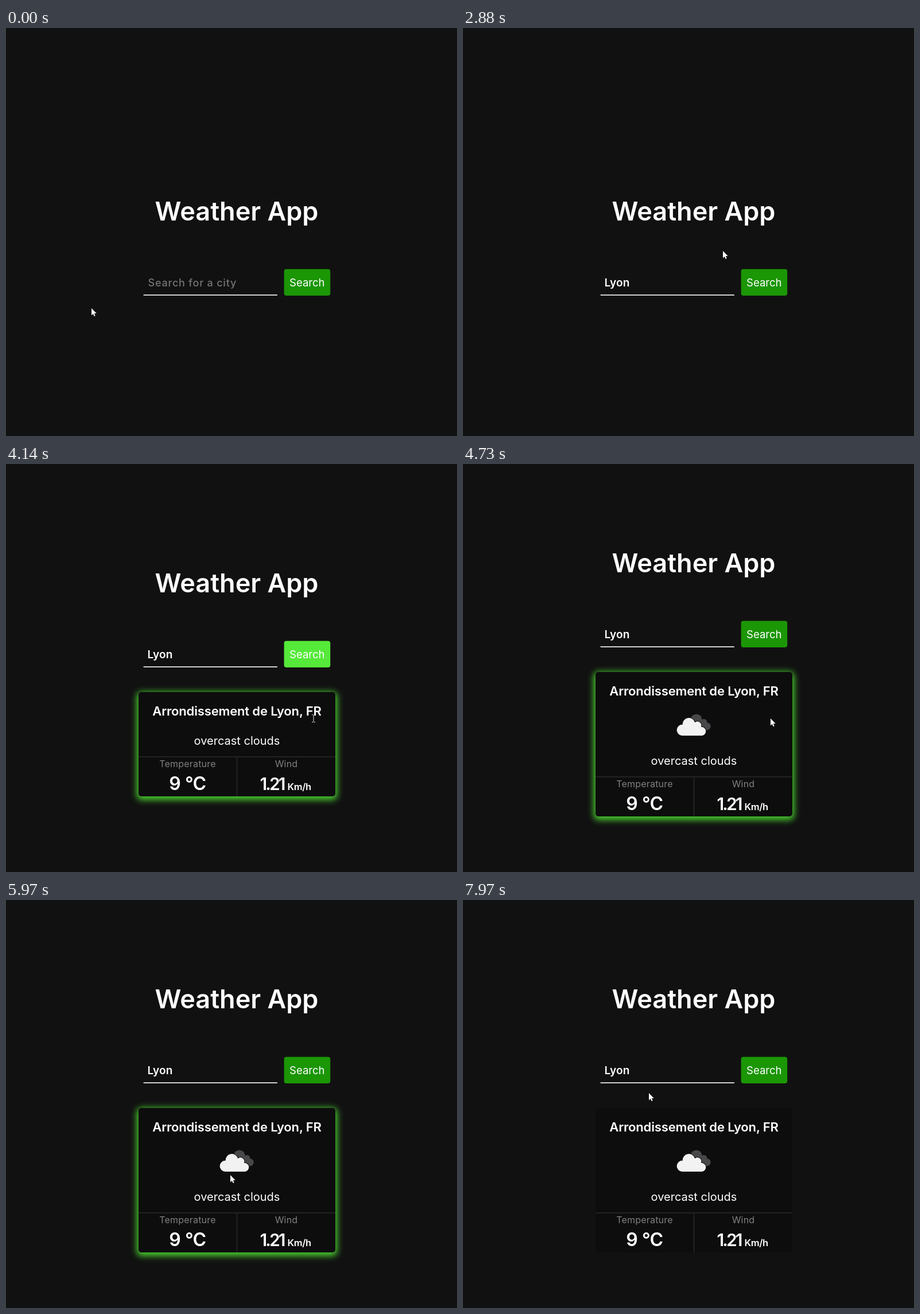
An HTML page for the animation above (8 s loop, 786x712 px).

```html
<!DOCTYPE html>
<html lang="en">
<head>
<meta charset="utf-8">
<title>Weather App</title>
<style>
  html, body { margin: 0; width: 100%; height: 100%; overflow: hidden; background: #111; }
  svg { position: absolute; left: 0; top: 0; }
  text { font-family: Inter, Roboto, sans-serif; fill: #fff; }
  .mid { text-anchor: middle; }
  #title { font-size: 45px; font-weight: 600; }
  #hint { font-size: 18px; font-weight: 500; letter-spacing: .8px; fill: #757575; }
  #typed { font-size: 19px; font-weight: 600; letter-spacing: .1px; }
  .label { font-size: 18.5px; }
  .city { font-size: 22px; font-weight: 600; letter-spacing: -.15px; }
  .sky { font-size: 20px; }
  .caption { font-size: 16px; letter-spacing: .2px; fill: #808080; }
  .value { font-size: 32px; font-weight: 600; letter-spacing: -.5px; }
  .speed { font-size: 30px; font-weight: 600; letter-spacing: -2.9px; }
  .unit { font-size: 16.5px; font-weight: 600; letter-spacing: -.4px; }
  #card { position: absolute; left: 231px; width: 343px; border-radius: 5px; background: #0d0d0d; }
</style>
</head>
<body>
<div id="card"></div>
<svg width="786" height="712" viewBox="0 0 786 712">
  <g id="top">
    <text id="title" class="mid" x="402" y="336">Weather App</text>
    <text id="hint" x="247.5" y="450.5">Search for a city</text>
    <text id="typed" x="246.5" y="450.5"></text>
    <rect id="caret" y="432" width="1" height="24" fill="#fff"/>
    <rect x="239.6" y="465.2" width="233.2" height="1.6" fill="#fff"/>
    <rect id="button" x="484.6" y="420.8" width="80.6" height="46.2" rx="4"/>
    <text class="label mid" x="524.8" y="450.5">Search</text>
  </g>
  <g id="result">
    <g id="head">
      <text class="city mid" x="402.5" y="439">Arrondissement de Lyon, FR</text>
    </g>
    <g id="cloud" transform="translate(-.8 -.6)">
      <g fill="#48484a">
        <circle cx="407.5" cy="447" r="10"/>
        <circle cx="420.5" cy="451" r="5.5"/>
        <circle cx="426" cy="458.3" r="6.5"/>
        <rect x="407" y="450" width="19" height="14.8"/>
      </g>
      <path fill="#f2f2f2" stroke="#0d0d0d" stroke-width="2" paint-order="stroke"
        d="M382.5 474.6A9.5 9.5 0 0 1 383.5 455.3A11 11 0 0 1 405 451.5A6.8 6.8 0 0 1 415.5 459.5A7.4 7.4 0 0 1 417.5 474.6Z"/>
    </g>
    <g id="details">
      <text class="sky mid" x="402.5" y="490">overcast clouds</text>
      <path d="M231 511H574M402.5 511V580" stroke="#2a2a2a" stroke-width="1.5"/>
      <text class="caption mid" x="316.5" y="529">Temperature</text>
      <text class="caption mid" x="488.5" y="529">Wind</text>
      <text class="value mid" x="316.5" y="569">9 °C</text>
      <text class="speed" x="442.5" y="569">1.21</text>
      <text class="unit" x="490.5" y="569">Km/h</text>
    </g>
  </g>
  <g id="pointer">
    <path id="arrow" fill="#fff" d="M0 0V12.4L2.8 9.8L4.7 14L6.6 13.2L4.8 9H8.7Z"/>
    <path id="beam" fill="none" stroke="#ddd" d="M-3 -6.5H-1L0 -5.5L1 -6.5H3M0 -5.5V5.5M-3 6.5H-1L0 5.5L1 6.5H3"/>
  </g>
</svg>
<script>
const LOOP = 8000, RESULT = 4140, ICON = 4230;
const $ = id => document.getElementById(id);
const show = (id, on) => { $(id).style.display = on ? '' : 'none'; };
const moveY = (id, y) => $(id).setAttribute('transform', `translate(0 ${y})`);

// Each key is [time, value, ...].
const path = [
  [2430, 149, 489], [2650, 300, 412], [2880, 452, 389], [2990, 492, 380],
  [3130, 525, 418], [3300, 536, 444], [4730, 536, 444], [4950, 648, 452],
  [5250, 574, 466.5], [5490, 500, 474], [5590, 500, 474], [6000, 380, 480],
  [6390, 212, 482], [6560, 188, 482], [6710, 191, 481], [6900, 258, 479],
  [7070, 322, 475], [7580, 322, 475], [7970, 324, 337]
];
const hover = [[3130, 0], [3280, 1], [RESULT, 1], [4310, 0]];
const glow = [[4830, 1], [4980, 0], [5255, 0], [5405, 1], [6360, 1], [6510, 0],
  [6830, 0], [6980, 1], [7790, 1], [7930, 0]];
const shift = [[0, 0], [3500, -12], [RESULT, -112], [ICON, -147]];
const typing = [[0, '', 248], [1090, 'L', 257], [1350, 'Ly', 266], [1600, 'Lyo', 278], [2000, 'Lyon', 290]];
const blinks = [[90, 580], [1090, 2500], [3000, 3450]];

const step = (keys, t) => keys.filter(k => k[0] <= t).pop();

function linear(keys, t) {
  const i = keys.findIndex(k => k[0] > t);
  if (i < 0) return keys[keys.length - 1][1];
  if (i === 0) return keys[0][1];
  const [a, b] = [keys[i - 1], keys[i]];
  return a[1] + (b[1] - a[1]) * (t - a[0]) / (b[0] - a[0]);
}

// Flat at rests and turning points, central difference elsewhere.
function slope(keys, i, c) {
  const [a, b, d] = [keys[i - 1], keys[i], keys[i + 1]];
  if (!a || !d || (b[c] - a[c]) * (d[c] - b[c]) <= 0) return 0;
  return (d[c] - a[c]) / (d[0] - a[0]);
}

function smooth(keys, t, c) {
  const i = keys.findIndex(k => k[0] > t);
  if (i < 0) return keys[keys.length - 1][c];
  if (i === 0) return keys[0][c];
  const a = keys[i - 1], b = keys[i], span = b[0] - a[0], u = (t - a[0]) / span;
  const ease = u * u * (3 - 2 * u);
  return a[c] + (b[c] - a[c]) * ease
    + span * u * (1 - u) * ((1 - u) * slope(keys, i - 1, c) - u * slope(keys, i, c));
}

const mix = (from, to, k) => `rgb(${from.map((v, i) => Math.round(v + (to[i] - v) * k))})`;

function draw(t) {
  const found = t >= RESULT, grow = t >= ICON ? 35 : 0;
  const [, word, caretX] = step(typing, t);

  moveY('top', step(shift, t)[1]);
  show('hint', !word);
  $('typed').textContent = word;
  $('caret').setAttribute('x', caretX);
  show('caret', blinks.some(([on, off]) => t >= on && t < off));
  $('button').setAttribute('fill', mix([27, 150, 5], [85, 233, 57], linear(hover, t)));

  show('card', found);
  show('result', found);
  show('cloud', grow);
  moveY('head', -grow);
  moveY('details', grow);
  const card = $('card').style;
  card.top = 398 - grow + 'px';
  card.height = 182 + 2 * grow + 'px';
  card.boxShadow = `0 3px 12px 3px rgba(75, 212, 48, ${linear(glow, t)})`;

  const overText = found && !grow;
  show('arrow', !overText);
  show('beam', overText);
  const x = Math.round(smooth(path, t, 1)), y = Math.round(smooth(path, t, 2));
  $('pointer').setAttribute('transform', `translate(${x} ${y})`);
}

const start = performance.now();
function tick() {
  draw((performance.now() - start) % LOOP);
  requestAnimationFrame(tick);
}
tick();
</script>
</body>
</html>
```
